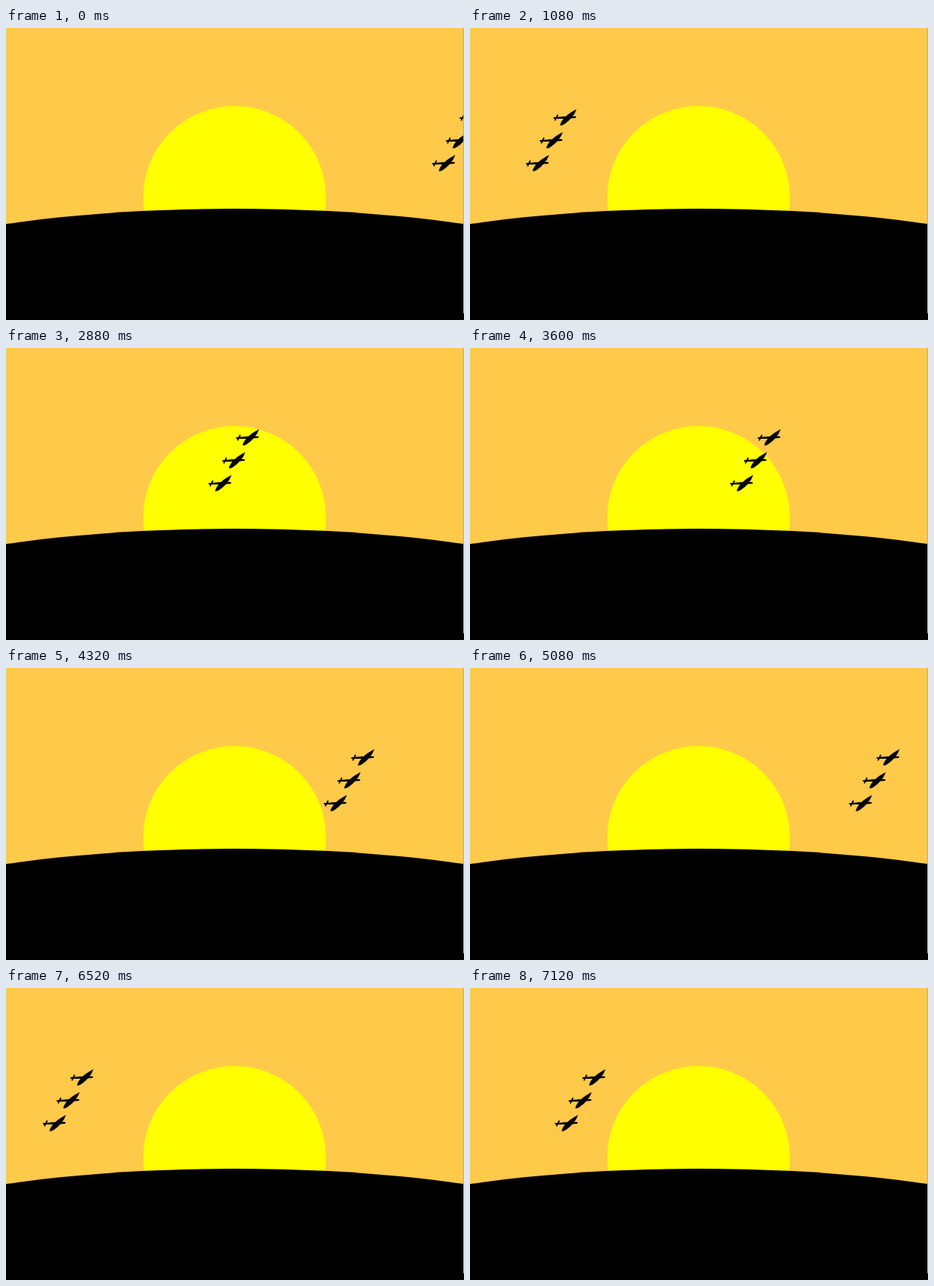
Recreate the animation shown at these times as an HTML page. Size 600 by 383 pixels, loop 7160 ms.

```html
<!DOCTYPE html>
<html>
<head>
<meta charset="utf-8">
<style>
  html, body { margin: 0; width: 100%; height: 100%; overflow: hidden; background: #ffc94a; }
  svg { display: block; width: 600px; height: 383px; }
</style>
</head>
<body>
<svg viewBox="0 0 600 383">
  <defs>
    <g id="plane">
      <path d="M9 21.6Q11.5 10.5 30.6 .6Q26.5 12.5 14 20.6Q11 22.4 9 21.6Z"/>
      <path d="M.2 11.2L14 10L29 9.8Q31 10.6 29.3 12L14 13L.6 13Z"/>
      <path d="M2.6 14.6L5.6 8.6" stroke="#000" stroke-width="1.9" stroke-linecap="round"/>
    </g>
  </defs>
  <rect width="600" height="383" fill="#ffc94a"/>
  <circle cx="299.5" cy="222" r="119.7" fill="#ff0"/>
  <g id="squad">
    <use href="#plane" y="166"/>
    <use href="#plane" x="18" y="136"/>
    <use href="#plane" x="36" y="106"/>
  </g>
  <ellipse cx="300" cy="386.3" rx="600" ry="149.3"/>
  <rect y="300" width="600" height="83"/>
  <rect x="599" width="1" height="374" fill="#b4aa96"/>
</svg>
<script>
  const LOOP = 7160, STEP = 40;
  const squad = document.getElementById('squad');

  // Each pass: start time, end time, then time and x of its waypoints.
  const passes = [
    [0, 80, [[0, 558], [80, 566.4]]],
    [120, 5760, [[120, -28.3], [1080, 73], [2120, 183], [2880, 265], [4320, 416], [5760, 568]]],
    [5800, LOOP, [[5800, -27.6], [5920, -15], [7120, 111], [7160, 115.2]]]
  ];

  function along(points, t) {
    const i = Math.max(1, points.findIndex(p => p[0] >= t));
    const [t0, x0] = points[i - 1], [t1, x1] = points[i];
    return x0 + (x1 - x0) * (t - t0) / (t1 - t0);
  }

  function draw(now) {
    const t = Math.floor(now % LOOP / STEP) * STEP;
    const pass = passes.find(([from, to]) => t >= from && t < to);
    squad.style.display = pass ? '' : 'none';
    if (pass) squad.setAttribute('transform', `translate(${along(pass[2], t)} 0)`);
  }

  let start;
  function tick(now) {
    start ??= now;
    draw(now - start);
    requestAnimationFrame(tick);
  }
  draw(0);
  requestAnimationFrame(tick);
</script>
</body>
</html>
```
